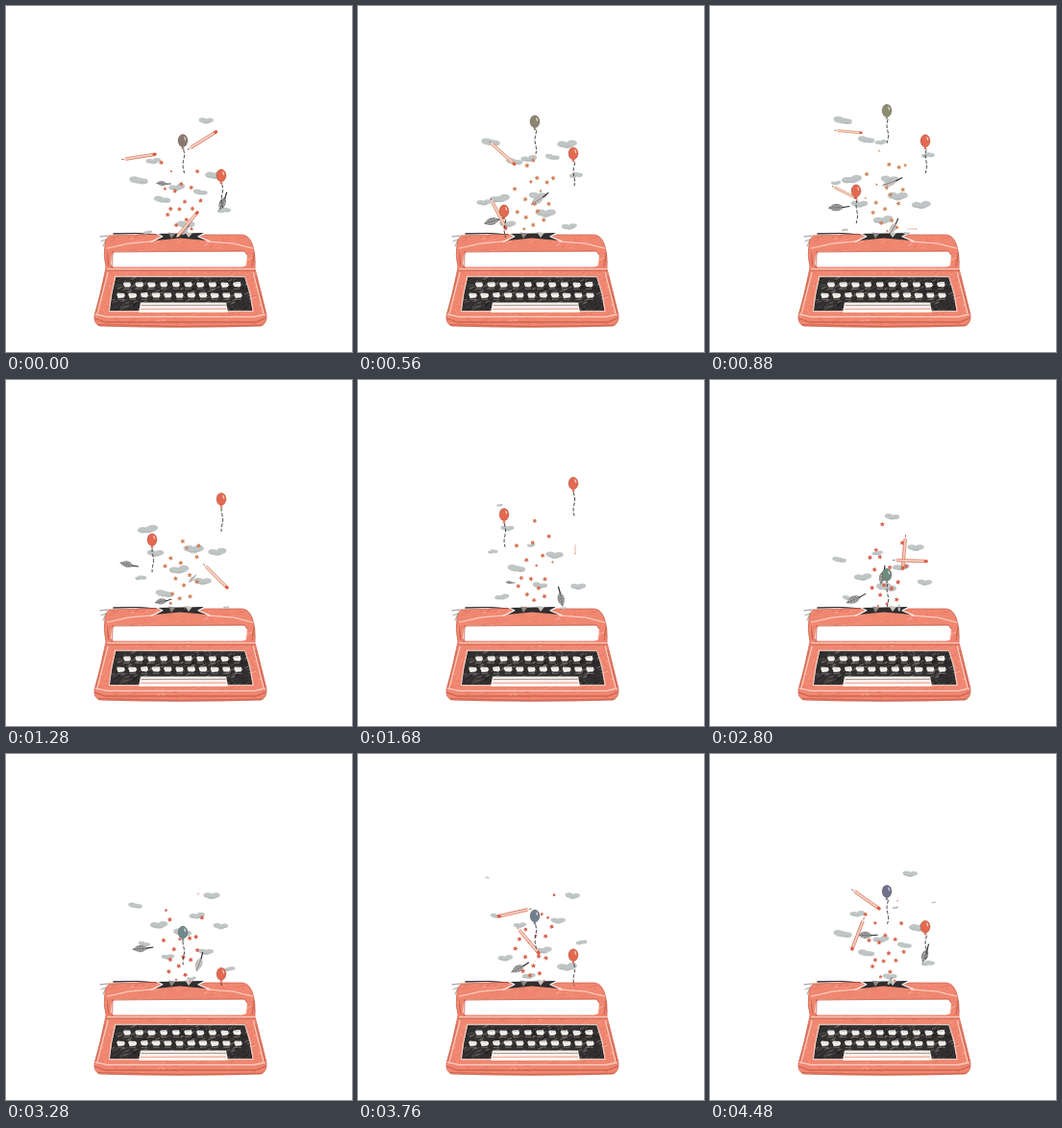
An HTML page with a canvas for the animation above (4560 ms loop, 360 by 360 pixels).

```html
<!DOCTYPE html>
<html lang="en">
<head>
<meta charset="utf-8">
<title>Typewriter</title>
<style>
html, body { margin: 0; width: 100%; height: 100%; overflow: hidden; background: #fff; }
canvas { display: block; width: 360px; height: 360px; }
</style>
</head>
<body>
<canvas id="stage"></canvas>
<script>
const LOOP = 4560, STEP = 80, SIZE = 360;
const MOUTH = { x: 183, y: 238 };
const dpr = window.devicePixelRatio || 1;

function makeLayer(canvas) {
  canvas.width = canvas.height = Math.round(SIZE * dpr);
  const c = canvas.getContext('2d');
  c.scale(canvas.width / SIZE, canvas.height / SIZE);
  c.lineCap = c.lineJoin = 'round';
  return c;
}

function randomFrom(seed) {
  return () => {
    seed = (seed * 1664525 + 1013904223) >>> 0;
    return seed / 4294967296;
  };
}

const lerp = (a, b, k) => a + (b - a) * k;
const clamp = v => Math.max(0, Math.min(1, v));
const times = (n, make) => Array.from({ length: n }, (_, i) => make(i));

function trace(c, pts) {
  c.beginPath();
  for (let i = 0; i < pts.length; i += 2) c.lineTo(pts[i], pts[i + 1]);
}

function polygon(c, pts, fill) {
  trace(c, pts);
  c.closePath();
  c.fillStyle = fill;
  c.fill();
}

function line(c, pts, color, width = 1) {
  trace(c, pts);
  c.strokeStyle = color;
  c.lineWidth = width;
  c.stroke();
}

function ellipse(c, x, y, rx, ry, fill) {
  c.beginPath();
  c.ellipse(x, y, rx, ry, 0, 0, Math.PI * 2);
  c.fillStyle = fill;
  c.fill();
}

function placed(c, x, y, angle, scale, paint) {
  c.save();
  c.translate(x, y);
  c.rotate(angle);
  c.scale(scale, scale);
  paint();
  c.restore();
}

function drawMachine(c) {
  const rnd = randomFrom(11);
  const deep = '#c9604c', pale = '#fbded4', ink = '#302e2e';

  // Hand-drawn line: two wobbling passes
  const sketch = (pts, color, width) => {
    for (let pass = 0; pass < 2; pass++) {
      line(c, pts.map(v => v + (rnd() - 0.5) * 0.9), color, width);
    }
  };
  const mirror = (pts, color, width) => {
    sketch(pts, color, width);
    sketch(pts.map((v, i) => i % 2 ? v : 363 - v), color, width);
  };
  // Crayon strokes inside the current clip
  const grain = (n, x, y, w, h, colors, width = 0.7) => {
    for (let i = 0; i < n; i++) {
      const px = x + rnd() * w, py = y + rnd() * h, len = 1 + rnd() * 4;
      line(c, [px, py, px + len, py - len * 0.4], colors[i % colors.length], width);
    }
  };

  // carriage
  sketch([112, 237, 135, 236.8, 166, 238.5], ink, 0.9);
  sketch([98, 240, 106, 239], '#999', 0.7);
  sketch([99, 245, 104, 243, 101, 250], '#aaa', 0.7);

  const body = new Path2D(
    'M108 239 Q150 237 181 238 L246 238 Q253 239 256 247 Q260 258 259 273' +
    ' L263 289 L271 321 Q272 330 265 333 Q180 335.500 98 333 Q91 331 92 322' +
    ' L98 300 L104 272 Q101 260 103 248 Q104 241 108 239Z');
  c.fillStyle = '#f08770';
  c.fill(body);
  c.save();
  c.clip(body);
  grain(620, 88, 237, 183, 98, ['#f79b86', '#e4745f', '#f28f7a', '#ea7c66']);
  grain(70, 88, 237, 183, 98, ['#fcd9cf', '#c9695a'], 0.5);
  c.restore();
  c.strokeStyle = deep;
  c.lineWidth = 0.7;
  c.stroke(body);

  // paper slot with its white flaps
  polygon(c, [157, 237, 206, 236, 200, 239.5, 209, 244, 181, 241.5, 156, 244, 163, 240], ink);
  polygon(c, [169, 235.5, 176, 237, 172, 242], '#8b8583');
  polygon(c, [186, 235, 194, 236, 190, 241], '#c8c2bf');
  mirror([151, 245, 163, 240, 156, 236.5], '#fff', 0.8);

  // lid
  mirror([106, 252, 127, 247, 154, 245], pale, 0.6);
  mirror([105, 257, 107, 270], deep, 0.7);
  polygon(c, [113, 255.5, 248, 255.5, 251, 259, 250, 270, 246, 271.5, 112, 271.5, 109, 269, 110, 259], '#fff');
  sketch([110, 272, 111, 256, 248, 255, 251, 259], deep, 0.5);
  sketch([105, 273.5, 259, 273.5], pale, 0.7);
  sketch([105, 275.2, 259, 275.2], deep, 0.5);

  // sides and base
  mirror([106, 277, 95, 320], pale, 0.6);
  mirror([103, 281, 93, 321], deep, 0.5);
  sketch([93, 321, 105, 323, 258, 323, 270, 321], pale, 0.7);
  sketch([92, 325, 103, 329, 260, 329, 270, 325], deep, 0.8);
  sketch([96, 332, 180, 333.5, 267, 332], deep, 0.6);

  // keyboard
  const board = [114, 281.5, 249, 281.5, 254, 300, 257, 317.5, 107, 317.5, 110, 300];
  polygon(c, board, ink);
  c.save();
  c.clip();
  grain(380, 105, 282, 154, 36, ['#5b5757', '#191818', '#8a8482', '#3c3939']);
  c.restore();
  sketch([...board, 114, 281.5], pale, 0.7);

  const key = (x, y) => {
    const w = 4 + rnd() * 0.6, tilt = rnd() - 0.5;
    polygon(c, [x - w, y - 1.5, x - w + 1, y - 3, x + w - 1, y - 3 + tilt,
      x + w, y, x + w - 1.5, y + 2, x - w + 1.5, y + 2 + tilt], '#f4f1ec');
    line(c, [x - 3, y - 1.6, x + 2, y - 1.8 + tilt], '#b9b3ae', 0.5);
    line(c, [x - 3, y + 3.8, x + 3, y + 3.8], '#9d9794', 0.6);
  };
  for (let i = 0; i < 10; i++) key(126 + i * 12.7, 290.5);
  for (let i = 0; i < 11; i++) key(119.5 + i * 12.2, 301.5);

  polygon(c, [140, 308.5, 229, 308.5, 231, 318.5, 138, 318.5], '#fbf3ee');
  sketch([141, 311.5, 228, 311.5], '#8f8987', 0.6);
  sketch([140, 315, 229, 315], '#f0a08d', 0.7);
  sketch([139, 318, 230, 318], '#fff', 0.8);
}

const paint = {
  cloud(c, o) {
    for (let i = -1; i <= 1; i++) {
      ellipse(c, i * 4, Math.sin(o.seed * 9 + i * 2) * 1.1, 4.2, 2.5, '#c0c5c6');
    }
    line(c, [-6, 1.5, -1, 2.3, 5, 1.7], '#a9aeb0', 0.5);
  },

  pencil(c, o, warm) {
    const r = o.len / 2;
    polygon(c, [-r, 0, 4 - r, -1.5, r, -1.5, r, 1.5, 4 - r, 1.5], '#f6d3c4');
    line(c, [4 - r, -1.3, r, -1.3], warm, 0.6);
    line(c, [4 - r, 1.3, r, 1.3], warm, 0.7);
    line(c, [r - 1.5, 0, r, 0], '#dc5946', 2.8);
    line(c, [-r, 0, 1 - r, 0], '#5a5552', 0.9);
  },

  feather(c, o) {
    const r = o.len / 2;
    c.beginPath();
    c.moveTo(-r, 0);
    c.quadraticCurveTo(-r * 0.2, -r * 0.75, r * 0.5, 0);
    c.quadraticCurveTo(-r * 0.2, r * 0.65, -r, 0);
    c.fillStyle = o.seed > 0.5 ? '#8b8b8b' : '#bdbbb9';
    c.fill();
    for (let x = -r * 0.6; x < r * 0.3; x += 3) line(c, [x - 1.5, -2, x, 0, x - 1.5, 2], '#e4e4e4', 0.5);
    line(c, [-r, 0, r * 0.4, 0], '#666', 0.6);
    line(c, [r * 0.4, 0, r, -0.7], '#222', 1.1);
  },

  star(c, o, warm) {
    const pts = [];
    for (let i = 0; i < 10; i++) {
      const radius = i % 2 ? 1.4 : 2.7, a = i * Math.PI / 5;
      pts.push(Math.cos(a) * radius, Math.sin(a) * radius);
    }
    polygon(c, pts, warm);
  }
};

// Things the machine throws out at an even beat; each climbs, drifts out and shrinks away
const rnd = randomFrom(42);
const stream = (kind, count, spread, life, speed, make) => times(count, i => ({
  kind,
  birth: (i + rnd() * 0.8) * LOOP / count,
  life: life * (0.6 + 0.8 * rnd()),
  x: MOUTH.x + spread * (2 * ((i * 0.618) % 1) - 1),
  speed: speed * (0.85 + 0.3 * rnd()),
  seed: rnd(),
  ...make()
}));

const items = [
  ...stream('cloud', 32, 52, 1450, 0.062, () => ({ size: 0.7 + rnd() * 0.6, start: 1, turn: 0, spin: 0 })),
  ...stream('feather', 10, 55, 1000, 0.05, () => ({ len: 18 + rnd() * 6, size: 1, start: 0.6, turn: -rnd() * 2, spin: 0.0007 })),
  ...stream('star', 52, 22, 1450, 0.047, () => ({ size: 1, start: 0.5, turn: rnd() * 6, spin: 0.002 }))
];

function drawItem(c, o, t, warm) {
  const age = (t - o.birth + LOOP) % LOOP;
  if (age > o.life) return;
  const x = lerp(MOUTH.x, o.x, lerp(o.start, 1, clamp(age / 900)));
  const scale = o.size * clamp(0.3 + age / 250) * clamp(0.3 + (o.life - age) / 300);
  placed(c, x, MOUTH.y - age * o.speed, o.turn + age * o.spin, scale, () => paint[o.kind](c, o, warm));
}

// One key pose per pencil: time, x, y, degrees. Climb and tumble follow the same rule.
const pencils = [
  [0, 204, 140, -32], [0, 138, 157, -9], [0, 188, 228, -50],
  [560, 150, 153, 42], [560, 146, 216, 63],
  [1280, 218, 204, 45],
  [2160, 251, 138, 27], [2160, 151, 203, 258], [2160, 136, 197, 174],
  [2800, 202, 179, 95], [2800, 208, 188, 2],
  [3760, 163, 165, 167], [3760, 177, 194, 50],
  [4480, 162, 151, 35], [4480, 154, 187, 111]
].map(([time, x, y, degrees]) => ({ time, x, y, turn: degrees * Math.PI / 180, len: 35 }));

function drawPencil(c, o, t, warm) {
  const dt = t - o.time, span = 440;
  if (Math.abs(dt) > span) return;
  const side = Math.sign(o.x - MOUTH.x);
  const scale = clamp((span - Math.abs(dt)) / 150);
  placed(c, o.x + side * dt * 0.02, o.y - dt * 0.07, o.turn + side * dt * 0.002, scale,
    () => paint.pencil(c, o, warm));
}

const balloons = [
  { x: 224, birth: 3020, life: 3840, speed: 0.041 },
  { x: 152, birth: 160, life: 2400, speed: 0.0655 },
  { x: 184, birth: 1760, life: 3960, speed: 0.0355, tinted: true }
];

function drawBalloon(c, o, t, tint) {
  const age = (t - o.birth + LOOP) % LOOP;
  if (age > o.life) return;
  const x = o.x, y = 240 - age * o.speed, fill = o.tinted ? tint : '#e4694f';
  const string = times(9, i => [x + 0.8 + Math.sin(i * 0.9 + t / 300) * 0.8, y + 9 + i * 3]).flat();
  c.setLineDash([3, 2.5]);
  line(c, string, '#333', 0.9);
  c.setLineDash([]);
  polygon(c, [x, y + 5, x + 1.6, y + 8.2, x - 1.6, y + 8.2], fill);
  ellipse(c, x, y - 0.5, 5, 6.5, fill);
  c.strokeStyle = 'rgba(80,40,35,.4)';
  c.lineWidth = 0.6;
  c.stroke();
  line(c, [x + 1.8, y - 4, x + 2.6, y - 1.5], 'rgba(255,255,255,.75)', 1.2);
}

const machine = document.createElement('canvas');
drawMachine(makeLayer(machine));
const ctx = makeLayer(document.getElementById('stage'));

function render(t) {
  // Crayon turns from red to ochre and back; the gray balloon drifts from brown to blue
  const ochre = (0.5 + 0.5 * Math.cos((t - 900) / LOOP * Math.PI * 2)) ** 3;
  const warm = `rgb(${lerp(214, 205, ochre)},${lerp(97, 138, ochre)},${lerp(78, 92, ochre)})`;
  const tint = `hsl(${20 + 220 * t / LOOP},11%,49%)`;

  ctx.fillStyle = '#fff';
  ctx.fillRect(0, 0, SIZE, SIZE);
  ctx.drawImage(machine, 0, 0, SIZE, SIZE);
  ctx.save();
  ctx.beginPath();
  ctx.rect(0, 0, SIZE, 241);
  ctx.clip();
  for (const o of items) drawItem(ctx, o, t, warm);
  for (const o of pencils) drawPencil(ctx, o, t, warm);
  for (const o of balloons) drawBalloon(ctx, o, t, tint);
  ctx.restore();
}

const start = performance.now();
function tick() {
  const t = (performance.now() - start) % LOOP;
  render(Math.floor(t / STEP) * STEP);
  requestAnimationFrame(tick);
}
tick();
</script>
</body>
</html>
```
